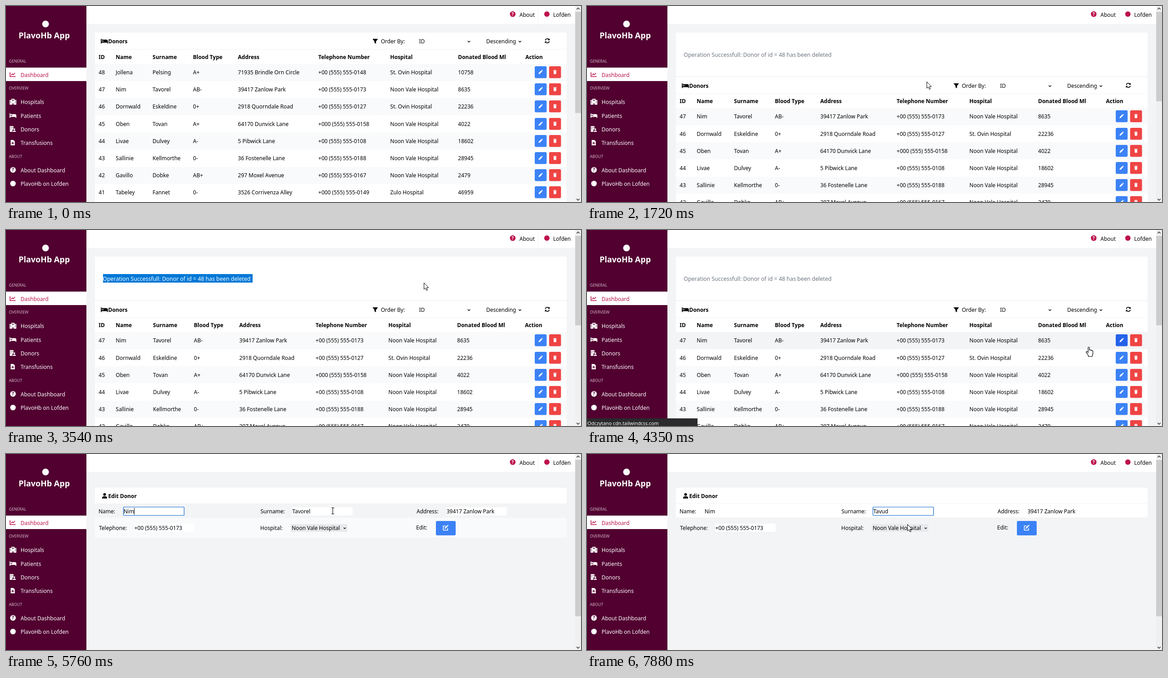
An HTML page that plays this animation: 1280x436 px, repeating every 7.99 s.

```html
<!DOCTYPE html>
<html lang="en">
<head>
<meta charset="utf-8">
<title>Donor dashboard</title>
<style>
html, body { margin: 0; width: 100%; height: 100%; overflow: hidden; background: #f3f4f6; }
svg { display: block; font-family: "Noto Sans", "Open Sans", sans-serif; }
</style>
</head>
<body>
<svg id="stage" width="1280" height="436" viewBox="0 0 1280 436"></svg>
<script>
const LOOP = 7990;
const stage = document.getElementById('stage');
const pen = document.createElement('canvas').getContext('2d');
pen.font = '12px "Noto Sans", "Open Sans", sans-serif';
const textWidth = s => pen.measureText(s).width;

const PINK = '#be124e', BLUE = '#3b82f6', BLUE_DARK = '#2563eb', RED = '#ef4444', RED_DARK = '#dc2626';
const PAGE = '#f3f4f6', STRIPE = '#f9fafb', SELECT = '#0078d7';

const WEST = 'Noon Vale Hospital', SAINT = 'St. Ovin Hospital';
const donors = [
  [48, 'Jollena', 'Pelsing', 'A+', '71935 Brindle Orn Circle', '+00 (555) 555-0148', SAINT, 10758],
  [47, 'Nim', 'Tavorel', 'AB-', '39417 Zanlow Park', '+00 (555) 555-0173', WEST, 8635],
  [46, 'Dornwald', 'Eskeldine', '0+', '2918 Quorndale Road', '+00 (555) 555-0127', SAINT, 22236],
  [45, 'Oben', 'Tovan', 'A+', '64170 Dunvick Lane', '+000 (555) 555-0158', WEST, 4022],
  [44, 'Livae', 'Dulvey', 'A-', '5 Pibwick Lane', '+00 (555) 555-0108', WEST, 18602],
  [43, 'Sallinie', 'Kellmorthe', '0-', '36 Fostenelle Lane', '+00 (555) 555-0188', WEST, 28945],
  [42, 'Gavillo', 'Dobke', 'AB+', '297 Moxel Avenue', '+00 (555) 555-0167', WEST, 2479],
  [41, 'Tabeley', 'Fannet', '0-', '3526 Corrivenza Alley', '+000 (555) 555-0149', 'Zulo Hospital', 46959],
];
const headings = ['ID', 'Name', 'Surname', 'Blood Type', 'Address', 'Telephone Number', 'Hospital', 'Donated Blood Ml', 'Action'];
const [, firstName, lastName, , street, phone] = donors[1];
const NEW_NAME = 'Tavud';

// Drawing helpers
const rect = (x, y, w, h, fill, extra = '') =>
  `<rect x="${x}" y="${y}" width="${w}" height="${h}" fill="${fill}" ${extra}/>`;
const text = (s, x, y, fill = '#000', extra = '') =>
  `<text x="${x}" y="${y}" fill="${fill}" font-size="12" ${extra}>${s}</text>`;
const bold = (s, x, y) => text(s, x, y, '#000', 'font-weight="700"');
const disc = (x, y, r, fill) => `<circle cx="${x}" cy="${y}" r="${r}" fill="${fill}"/>`;

const shapes = {
  bed: 'M-8-5h1.8v6h4.5v-4.2h6a3.6 3.6 0 0 1 3.6 3.6v5.1h-1.8v-2H-6.2v2H-8zM-5.7-1.8a1.9 1.9 0 1 1 3.8 0a1.9 1.9 0 1 1-3.8 0z',
  hospital: 'M-7.5-4h4v-2.5h7V-4h4V6.5H1.2v-3H-1.2v3H-7.5zM-.6-5v1.2h-1.2v1.2h1.2v1.2H.6v-1.2h1.2v-1.2H.6V-5zM-6-2h1.6v1.6H-6zM-6 1.5h1.6v1.6H-6zM4.4-2H6v1.6H4.4zM4.4 1.5H6v1.6H4.4z',
  clinic: 'M-6.5-6.5H1.5v5L-.8 3v3.5H-6.5zM-5-4.5h1.5V-3H-5zM-1.5-4.5H0V-3H-1.5zM-5-1h1.5V.5H-5zM1.5.8a2 2 0 1 1 4 0a2 2 0 1 1-4 0zM0 6.5a3.5 3 0 0 1 7 0z',
  file: 'M-5-6.5H1.5L5-3V6.5H-5zM-.8-2v2.2H-3v1.6h2.2V4H.8V1.8H3V.2H.8V-2z',
  filter: 'M-6-5.5H6L1.6.5v5L-1.6 3.5v-3z',
  trash: 'M-4-4.5h2.2l.6-.9h2.4l.6.9H4v1.4H-4zM-3.4-2.4h6.8L2.9 5h-5.8z',
  pencil: 'M-5 5l.6-3L1.4-3.8l2.4 2.4L-2 4.4zM2-4.4l1-1Q4-5.4 5-4.2T4.9-2.5L4.4-2z',
  user: 'M-3-3a3 3 0 1 1 6 0a3 3 0 1 1-6 0zM-5.5 6a4 4 0 0 1 4-5h3a4 4 0 0 1 4 5z',
  arrowheads: 'M5.3-5.5v4.3H1zM-5.3 5.5V1.2H-1z',
};
const lines = {
  chart: 'M-6-5V4.5H6.5M-3.5 1.5L-1-1.5 1.2.5 5-3.5',
  chevron: 'M-3-1.5L0 1.5 3-1.5',
  refresh: 'M-4.6-1A4.8 4.8 0 0 1 4-2.6M4.6 1A4.8 4.8 0 0 1-4 2.6',
  square: 'M0-4H-5V5.5H4.5V1',
};
const icon = (name, x, y, color = '#000', scale = 1) => {
  const paint = shapes[name] ? `fill="${color}" fill-rule="evenodd"` : `fill="none" stroke="${color}" stroke-width="1.6"`;
  return `<path d="${shapes[name] || lines[name]}" transform="translate(${x} ${y}) scale(${scale})" ${paint}/>`;
};
const question = (x, y, fill, mark) => disc(x, y, 6.3, fill) +
  `<text x="${x}" y="${y + 3.5}" font-size="10" font-weight="700" text-anchor="middle" fill="${mark}">?</text>`;

// White copy of a text on a selection colour, limited to a box
const selected = (x, y, w, h, content) => rect(x, y, w, h, SELECT) +
  `<svg x="${x}" y="${y}" width="${w}" height="${h}" viewBox="${x} ${y} ${w} ${h}">${content}</svg>`;

const route = [
  [0, 1040, 425], [7, 1219, 146], [11, 1219, 146], [14, 756, 168], [19, 756, 168],
  [22, 552, 108], [27, 218, 108], [28, 205, 118], [29, 205, 118], [32, 930, 117],
  [34, 1222, 236], [37, 1190, 246], [39, 1190, 246], [40, 1117, 260], [42, 975, 268],
  [43, 975, 268], [46, 978, 172], [51, 330, 128], [52, 330, 128], [54, 727, 126],
  [55, 727, 126], [60, 645, 163], [70, 645, 163], [71, 735, 105], [75, 713, 156],
];
function pointerAt(tick) {
  if (tick < 0) return [-99, -99];
  const i = route.findIndex(p => p[0] >= tick);
  const b = route[i], a = route[Math.max(0, i - 1)];
  const k = b === a ? 1 : (tick - a[0]) / (b[0] - a[0]);
  return [1, 2].map(n => Math.round(a[n] + (b[n] - a[n]) * k));
}
// While a page loads or the button is held, hover stays where it was
const holds = [[11, 12], [37, 40], [55, 70]];
const hoverAt = tick => pointerAt((holds.find(([a, b]) => tick >= a && tick <= b) || [tick])[0]);

const cursors = {
  arrow: '<path d="M0 0V14.5L3.3 11.6 5.6 17 7.9 16 5.6 10.8H10.2Z" fill="#fff" stroke="#000"/>',
  hand: '<path d="M-2 1.5Q-2 0-.5 0T1 1.5V6.5Q2.7 5.6 3.6 7 5.4 6.2 6.2 7.8 8.6 7.3 8.8 9.5V14Q8.8 16 7.3 18v3H-1.5V18.5L-6 12Q-6.8 9.6-4.5 9.8L-2 12Z" fill="#fff" stroke="#000" stroke-width="1.2"/>',
  beam: '<path d="M-3-7H-1L0-6 1-7H3M0-6V6M-3 7H-1L0 6 1 7H3" fill="none" stroke="#000" stroke-width="1.1"/>',
};

function frameParts(thumbEnd) {
  const item = (s, y) => text(s, 32.5, y, '#fff');
  const label = (s, y) => `<text x="6.5" y="${y}" font-size="8.8" font-weight="300" fill="#d3b9c8">${s}</text>`;
  return rect(179, 0, 1088, 40, '#fff') + rect(1184, 0, 1, 40, PAGE) +
    question(1128, 18, PINK, '#fff') + text('About', 1143, 24) +
    disc(1204, 18, 6, PINK) + text('Lofden', 1218, 24) +
    rect(0, 0, 179, 436, '#510030') + disc(88, 40, 7.5, '#fff') +
    '<text x="85" y="72" font-size="18" font-weight="700" text-anchor="middle" fill="#fff">PlavoHb App</text>' +
    label('GENERAL', 125.5) + label('OVERVIEW', 186) + label('ABOUT', 337.5) +
    rect(0, 137, 179, 30, '#fff') + icon('chart', 15, 152.5, PINK) + text('Dashboard', 32.5, 158, PINK) +
    icon('hospital', 15.5, 213, '#fff') + item('Hospitals', 218) +
    icon('bed', 15.5, 243.5, '#fff', .95) + item('Patients', 249) +
    icon('clinic', 15, 273.5, '#fff') + item('Donors', 279) +
    icon('file', 15, 304, '#fff', .92) + item('Transfusions', 309) +
    question(15.5, 364.5, '#fff', '#510030') + item('About Dashboard', 370) +
    disc(15.5, 395, 6.2, '#fff') + item('PlavoHb on Lofden', 400) +
    rect(1267, 0, 13, 436, '#f0f0f0') + rect(1267, 13, 13, thumbEnd - 13, '#cdcdcd') +
    icon('chevron', 1273.5, 6, '#505050', -1.1) + icon('chevron', 1273.5, 430.5, '#505050', 1.1);
}

function donorTable(list, top, columns, [hx, hy]) {
  const inside = (x, y) => hx >= x && hx < x + 26.5 && hy >= y && hy < y + 26.5;
  let out = rect(198, top, 1050, 440, '#fff', 'rx="2"') + rect(198, top + 37, 1050, 1, PAGE) +
    icon('bed', 219, top + 19, '#000', .98) + bold('Donors', 227.5, top + 24) +
    icon('filter', 822, top + 19.5) + text('Order By:', 834.5, top + 24) +
    text('ID', 919.5, top + 24) + icon('chevron', 1030.5, top + 20, '#000', .9) +
    text('Descending', 1069, top + 24) + icon('chevron', 1144, top + 20, '#000', .9) +
    icon('refresh', 1205, top + 18.5) + icon('arrowheads', 1205, top + 18.5);
  const base = top === 59 ? 0 : 98.4;
  headings.forEach((h, i) => out += bold(h, columns[i] - .7, Math.round(118 + base)));
  list.forEach((donor, i) => {
    const shift = base + 38.2 * i, y = 128.5 + shift;
    const hovered = hx > 198 && hx < 1248 && hy >= y && hy < y + 38.2;
    out += rect(198, Math.round(y), 1050, 38, hovered ? PAGE : i % 2 ? '#fff' : STRIPE);
    donor.forEach((cell, c) => out += text(cell, columns[c] - .7, Math.round(152 + shift)));
    const by = Math.round(134 + shift);
    out += rect(1177, by, 26.5, 26.5, inside(1177, by) ? BLUE_DARK : BLUE, 'rx="3"') +
      icon('pencil', 1190, by + 13, '#fff', .9) +
      rect(1209, by, 26.5, 26.5, inside(1209, by) ? RED_DARK : RED, 'rx="3"') +
      icon('trash', 1222, by + 13, '#fff', .9);
  });
  return out;
}

function listPage(hover) {
  return donorTable(donors, 59, [207, 245, 327, 417, 517, 696, 856, 1007, 1157], hover) + frameParts(238);
}

function deletedPage(tick, hover, [px]) {
  const message = fill => `<text x="215.3" y="113" font-size="12.4" fill="${fill}">Operation Successfull: Donor of id = 48 has been deleted</text>`;
  let out = rect(198, 59, 1050, 97, '#fff', 'rx="2"') + message('#6b7280');
  if (tick > 22 && tick < 36) {
    const from = tick < 28 ? Math.max(216, px) : 216;
    out += selected(from, 98, 549 - from, 19, message('#fff'));
  }
  return out + donorTable(donors.slice(1), 158, [207, 245, 328, 419, 520, 690, 852, 1005, 1156], hover) + frameParts(212);
}

function editPage(tick, [hx, hy], [px]) {
  const hoverRow = (a, b) => hx > 198 && hx < 1248 && hy >= a && hy < b;
  const field = (x, y, s) => rect(x, y, 135, 18, '#fff') + text(s, x + .7, y + 13.5);
  const focus = x => rect(x + .5, 118, 135, 18.5, 'none', 'stroke="#0a66d0" stroke-width="1.2" rx="1"');
  const caret = (x, s) => rect(Math.round(x + 1 + textWidth(s)), 120, 1, 15, '#000');
  const typed = tick < 65 ? lastName : NEW_NAME.slice(0, Math.min(tick, 69) - 64);
  const surname = tick >= 70 ? NEW_NAME : tick > 68 ? NEW_NAME.slice(0, 4) : typed;
  const overButton = hx >= 957 && hx < 1001 && hy >= 149 && hy < 181;

  let out = rect(198, 75, 1050, 35, '#fff', 'rx="2"') + icon('user', 219.5, 93) + bold('Edit Donor', 227.5, 98) +
    rect(198, 111, 1050, 30, hoverRow(111, 142) ? PAGE : '#fff') +
    rect(198, 142, 1050, 44, hoverRow(142, 186) ? PAGE : STRIPE) +
    text('Name:', 206, 132) + field(261, 118.5, firstName) +
    text('Surname:', 566.5, 132) + field(636.5, 118.5, surname) +
    text('Address:', 914, 132) + field(980, 118.5, street) +
    text('Telephone:', 207, 169) + field(285, 155, phone) +
    text('Hospital:', 566, 169) + rect(634, 156, 126, 17, '#e9e9ed', 'rx="1"') + text(WEST, 636, 169) +
    icon('chevron', 754, 165, '#000', .8) +
    text('Edit:', 913, 168) + rect(957, 149, 44, 32, overButton ? BLUE_DARK : BLUE, 'rx="3"') +
    icon('square', 978.5, 164, '#fff') + icon('pencil', 980.5, 162, '#fff', .85);
  if (tick >= 51 && tick < 55) out += focus(261) + caret(261, firstName);
  if (tick >= 55) out += focus(636);
  if (tick > 55 && tick < 65) {
    const end = 637.5 + textWidth(lastName), from = tick < 60 ? Math.min(end, px) : 637;
    if (end - from > 1) out += selected(from, 119.5, end - from, 16, text(lastName, 637.2, 132, '#fff'));
  }
  if (tick >= 65 && tick < 75) out += caret(636.5, surname);
  return out + frameParts(361);
}

function statusBar(tick) {
  const bar = (s, w, opacity = 1) => `<g opacity="${opacity}">${rect(0, 419, w, 17, '#2b2a2c')}` +
    `<text x="1" y="434" font-size="10.8" fill="#fff">${s}</text></g>`;
  const link = 'localhost:8020/';
  if (tick >= 8 && tick < 12) return bar(link + 'deleteDonor.php?id=48', 198, [.4, .8][tick - 8]);
  if (tick === 38 || tick === 39) return bar(link + 'editDonor.php?id=47', 186, [.4, 1][tick - 38]);
  if ([12, 13, 40, 41].includes(tick)) return bar('Odczytano cdn.tailwindcss.com', 246);
  return '';
}

function cursor(tick, [x, y], [hx, hy]) {
  if (tick < 0 || (tick >= 65 && tick < 71)) return '';
  const over = (l, t, r, b) => hx >= l && hx < r && hy >= t && hy < b;
  const editing = tick > 40, listing = tick < 13;
  const onButton = editing ? over(957, 149, 1001, 181)
    : over(1177, listing ? 134 : 232, 1236, listing ? 161 : 259);
  const onText = editing ? over(261, 118, 397, 138) || over(636, 118, 772, 138)
    : !listing && over(216, 98, 560, 118);
  return `<g transform="translate(${x + .5} ${y + .5})">${cursors[onButton ? 'hand' : onText ? 'beam' : 'arrow']}</g>`;
}

let shown;
function draw(now) {
  const tick = Math.min(75, Math.floor((now % LOOP - 300) / 101.07 + .12));
  if (tick !== shown) {
    shown = tick;
    const pointer = pointerAt(tick), hover = hoverAt(tick);
    const page = tick < 13 ? listPage(hover) : tick < 41 ? deletedPage(tick, hover, pointer) : editPage(tick, hover, pointer);
    stage.innerHTML = rect(0, 0, 1280, 436, PAGE) + page + statusBar(tick) + cursor(tick, pointer, hover);
  }
  requestAnimationFrame(() => draw(performance.now() - start));
}
const start = performance.now();
draw(0);
</script>
</body>
</html>
```
